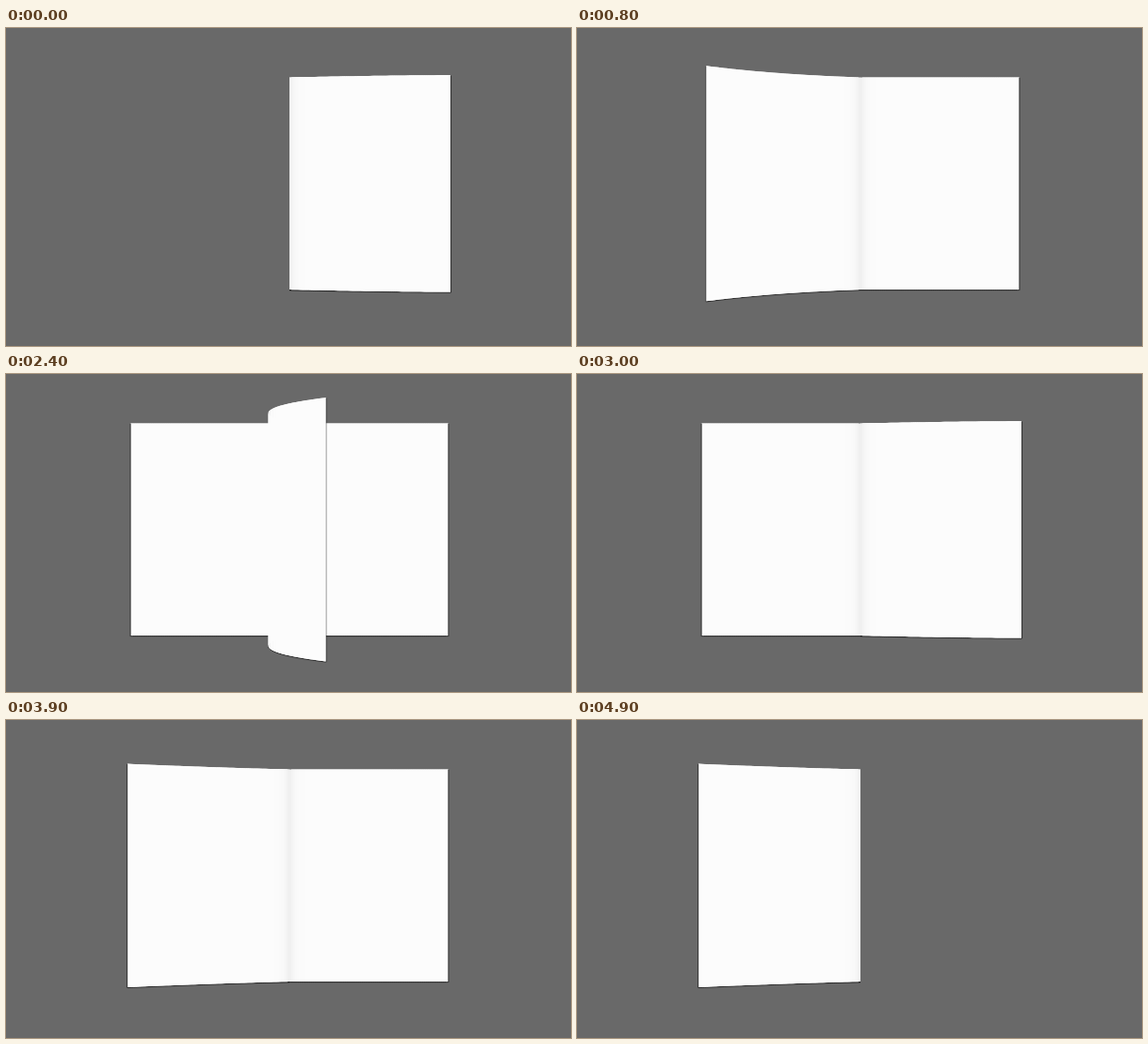
Animation of 600x338 px, one loop 5 s. Source, as an HTML page with a canvas:

```html
<!DOCTYPE html>
<html lang="en">
<head>
<meta charset="utf-8">
<title>Turning pages</title>
<style>
  html, body { margin: 0; width: 100%; height: 100%; overflow: hidden; background: #696969; }
  canvas { display: block; width: 600px; height: 338px; }
</style>
</head>
<body>
<canvas id="stage" width="600" height="338"></canvas>
<script>
const ctx = document.getElementById('stage').getContext('2d');
const SPINE = 301, MID = 165.3, HALF = 112.8, WIDTH = 168.4, DEPTH = 820;
const STEP = 100, STEPS = 10, FLIPS = 5, SAMPLES = 84;
const RAD = Math.PI / 180;

// One turn of a page: [chord angle in degrees, chord length]
const TURN = [
  [6, 168.3], [24, 168], [42, 166], [61, 164], [79, 163],
  [98, 162], [117, 161.5], [134.5, 164.5], [151.5, 168], [166, 168.3]
];

const polar = (deg, r) => ({ x: r * Math.cos(deg * RAD), z: r * Math.sin(deg * RAD) });

function project(x, z) {
  const s = DEPTH / (DEPTH - z);
  return { x: SPINE + x * s, top: MID - HALF * s, bottom: MID + HALF * s };
}

// Sheet profile: a quadratic curve from the spine to the free edge
function drawPage(angle, length, bend) {
  const tip = polar(angle, length);
  const ctl = polar(angle + bend, length * (0.5 + bend * 0.0046));
  const pts = [];
  for (let i = 0; i <= SAMPLES; i++) {
    const t = i / SAMPLES, a = 2 * t * (1 - t), b = t * t;
    pts.push(project(a * ctl.x + b * tip.x, a * ctl.z + b * tip.z));
  }

  ctx.lineWidth = 1;
  ctx.strokeStyle = 'rgba(0,0,0,.6)';
  ctx.beginPath();
  pts.forEach(p => ctx.lineTo(p.x, p.bottom + 0.6));
  ctx.stroke();

  for (let i = 0; i < SAMPLES; i++) {
    const p = pts[i], q = pts[Math.min(i + 2, SAMPLES)];
    const dist = (i + 0.5) / SAMPLES * length;
    const g = Math.round(252 - 15 * Math.exp(-dist / 4.5));
    ctx.fillStyle = `rgb(${g},${g},${g})`;
    ctx.beginPath();
    ctx.moveTo(p.x, p.top);
    ctx.lineTo(q.x, q.top);
    ctx.lineTo(q.x, q.bottom);
    ctx.lineTo(p.x, p.bottom);
    ctx.fill();
  }

  // Dark free edge, fainter when the edge points at the viewer
  const dx = tip.x - ctl.x, dz = tip.z - ctl.z;
  const slant = Math.abs(dx) / Math.hypot(dx, dz);
  const end = pts[SAMPLES], x = end.x + Math.sign(dx) * 0.5;
  ctx.strokeStyle = `rgba(0,0,0,${0.6 * slant * slant})`;
  ctx.beginPath();
  ctx.moveTo(x, end.top + 0.5);
  ctx.lineTo(x, end.bottom + 0.8);
  ctx.stroke();
}

function draw(ms) {
  const tick = Math.floor(ms / STEP) % (STEPS * FLIPS);
  const flip = Math.floor(tick / STEPS), step = tick % STEPS;
  const [angle, length] = TURN[step];
  const bend = 40 * Math.pow(Math.sin(Math.PI * (step + 0.5) / STEPS), 1.3);

  ctx.fillStyle = '#696969';
  ctx.fillRect(0, 0, 600, 338);
  if (flip > 0) drawPage(180, WIDTH, 0);
  if (flip < FLIPS - 1) drawPage(0, WIDTH, 0);
  drawPage(angle, length, bend);
}

const start = performance.now();
function loop() {
  draw(performance.now() - start);
  requestAnimationFrame(loop);
}
loop();
</script>
</body>
</html>
```
